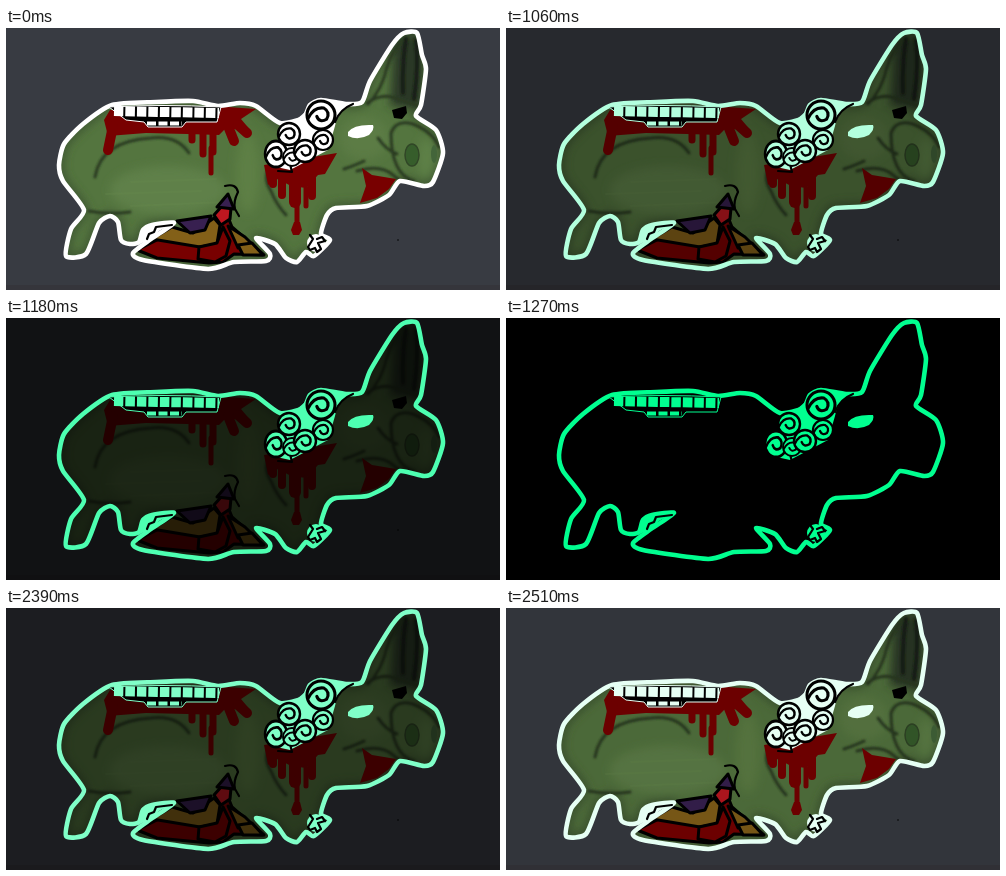
Write an HTML page that moves like this. It is 494 by 262 pixels and loops after 2.54 s.

```html
<!DOCTYPE html>
<html lang="en">
<head>
<meta charset="utf-8">
<title>Zombie pig</title>
<style>
  html, body { margin: 0; width: 100%; height: 100%; overflow: hidden; background: #000; }
  svg { display: block; width: 494px; height: 262px; color: #fff; }
  path { stroke-linejoin: round; stroke-linecap: round; }
  .ink { fill: none; stroke: #000; stroke-width: 2.2; }
  .crease { fill: none; stroke: #293a20; stroke-width: 3; }
  .blood { fill: #780000; }
  .drips { fill: none; stroke: #780000; }
  .guts path { stroke: #000; stroke-width: 3; }
  .glow { fill: currentColor; }
  .teeth path { fill: none; stroke: currentColor; stroke-linecap: butt; }
</style>
</head>
<body>
<svg viewBox="0 0 494 262">
  <defs>
    <path id="outline"/>
    <clipPath id="inside"><use href="#outline"/></clipPath>
    <filter id="soft" x="-30%" y="-30%" width="160%" height="160%"><feGaussianBlur stdDeviation="5"/></filter>
    <filter id="smudge" x="-30%" y="-30%" width="160%" height="160%"><feGaussianBlur stdDeviation=".9"/></filter>
    <g id="curl">
      <circle class="glow" r="10" stroke="#000" stroke-width="2.2"/>
      <path class="ink" d="M-9 2 Q-5 -6 2 -5 Q7 -2 4 3 Q-1 6 -3 1"/>
    </g>
  </defs>

  <!-- Everything here fades to black -->
  <rect width="494" height="262" fill="#383b42"/>
  <rect y="257" width="494" height="5" fill="#35353b"/>
  <circle cx="392" cy="212" r=".8"/>
  <g clip-path="url(#inside)">
    <use href="#outline" fill="#54753f"/>
    <g filter="url(#soft)">
      <use href="#outline" fill="none" stroke="#3d5530" stroke-width="9"/>
      <ellipse cx="162" cy="162" rx="58" ry="24" fill="#5f8048"/>
      <ellipse cx="242" cy="145" rx="12" ry="40" fill="#5d7f45"/>
      <ellipse cx="358" cy="110" rx="25" ry="22" fill="#5c7b45"/>
      <path d="M388 10 L415 5 415 82 384 78Z" fill="#2c3826"/>
      <ellipse cx="421" cy="130" rx="9" ry="20" fill="#5d8046"/>
    </g>
    <path d="M125 154 L210 151 M100 166 L195 163 M125 178 L220 174" stroke="#69884e" stroke-opacity=".3" stroke-width="2"/>
    <g class="crease" filter="url(#smudge)">
      <path d="M89 149 Q95 113 145 110 Q171 107 183 125 M83 183 Q102 187 124 184"/>
      <path d="M265 138 Q256 149 265 163 Q270 176 280 187 M338 141 Q350 137 358 133 M351 143 Q374 136 387 147 Q396 156 408 153"/>
      <path d="M362 76 Q376 62 381 39 Q387 20 400 9 M361 75 Q376 65 389 70 L413 78"/>
      <path d="M433 119 Q427 104 407 96 Q390 91 385 105 Q385 145 407 153 M372 110 Q380 122 391 126"/>
      <path d="M400 11 Q396 35 397 65 M410 12 Q413 39 408 71" stroke="#161f13" stroke-width="4"/>
    </g>
    <ellipse cx="406" cy="127" rx="7" ry="11" fill="#365d2b" stroke="#304626" stroke-width="1.5"/>
    <ellipse cx="428" cy="126" rx="3" ry="9" fill="#43653a"/>
    <path d="M386 82 L400 78 401 85 396 91 388 90Z"/>
  </g>

  <path class="blood" d="M104 82 L98 92 102 108 140 105 181 106 213 107 220 100 245 103 235 91 250 81 222 79Z"/>
  <g class="drips">
    <path stroke-width="10" d="M107 98 L102 122 M222 98 L228 113 M232 97 L241 105"/>
    <path stroke-width="7" d="M186 102 V112 M197 104 V126 M207 104 V124"/>
    <path stroke-width="5" d="M205 120 V145"/>
  </g>
  <path class="blood" d="M258 137 L262 157 272 151 285 158 300 160 312 147 319 146 331 125Z"/>
  <g class="drips">
    <path stroke-width="8" d="M276 148 V167 M306 150 V168 M267 148 V156"/>
    <path stroke-width="12" d="M289 150 V174"/>
    <path stroke-width="5" d="M291 170 V200 M300 160 V178"/>
  </g>
  <path class="blood" d="M288 194 H294 L296 202 293 207 H287 L285 202Z"/>
  <path class="blood" d="M356 140 L366 147 390 151 383 161 371 170 354 175 360 158Z"/>

  <g class="guts">
    <path class="blood" d="M131 222 L171 202 189 207 220 184 226 199 258 227 228 226 217 234 203 235 151 230Z"/>
    <path fill="#836018" d="M146 211 L166 199 187 205 208 190 214 197 211 216 194 219Z"/>
    <path fill="#382050" d="M171 193 L205 188 199 202 184 205Z"/>
    <path fill="#836018" d="M222 198 L239 209 247 217 232 220Z"/>
    <path class="blood" d="M193 219 L211 215 217 199 224 213 220 228 209 234 192 231Z"/>
    <path fill="#836018" d="M232 217 L246 215 257 227 237 227Z"/>
    <path fill="#be1720" d="M208 187 L216 178 225 180 224 191 215 197Z"/>
    <path fill="#382050" d="M211 179 L222 166 228 181Z"/>
  </g>
  <path class="ink" d="M219 158 Q230 155 232 164 Q227 174 229 181 L233 188"/>

  <rect id="shade" width="494" height="262" opacity="0"/>

  <!-- White parts turn green; the black lines on them stay -->
  <use href="#outline" fill="none" stroke="currentColor" stroke-width="4.6"/>
  <path class="glow" d="M136 200 L150 195 169 194 153 203 145 212 133 216Z"/>
  <path class="ink" d="M141 211 L143 206 148 204 150 199 166 197"/>

  <g class="teeth">
    <path d="M103 79 Q155 76 215 79 L211 94 H180 L176 99 H142 L138 94 120 92Z" style="fill:#000"/>
    <path d="M108 83 Q155 84 213 85" stroke-width="10" stroke-dasharray="9.5 2"/>
    <path d="M141 95.5 H176" stroke-width="4" stroke-dasharray="9 2.5"/>
  </g>

  <path class="glow" d="M306 78 Q322 70 347 76 Q332 82 329 98 L322 122 284 142 266 138 276 104Z"/>
  <path class="ink" d="M347 76 Q334 81 329 94 M284 136 L286 144 272 143"/>
  <use href="#curl" transform="translate(270 126) scale(1.1 1.3)"/>
  <use href="#curl" transform="translate(283 106) scale(1.1)"/>
  <use href="#curl" transform="translate(286 129) scale(.9)"/>
  <use href="#curl" transform="translate(315 87) scale(1.4)"/>
  <use href="#curl" transform="translate(317 112)"/>
  <use href="#curl" transform="translate(299 123) scale(1.1)"/>

  <path class="glow" d="M342 104 Q348 96 367 97 Q369 101 363 107 Q352 113 342 108Z"/>

  <circle class="glow" cx="310" cy="215" r="9"/>
  <path class="ink" d="M304 207 L307 211 302 219 304 222 309 220 311 224 315 221 312 215 319 213 316 209 311 211"/>
</svg>
<script>
  const LOOP = 2540, STEP = 30;
  const svg = document.querySelector("svg");
  const shade = document.getElementById("shade");

  // Closed curve through the given points, tight enough to keep corners.
  function smoothLoop(text) {
    const points = text.trim().split(/\s*,\s*/).map(pair => pair.split(" ").map(Number));
    const at = i => points[(i + points.length) % points.length];
    const handle = (i, sign) => at(i).map((v, k) => v + sign * (at(i + 1)[k] - at(i - 1)[k]) / 9);
    return `M${at(0)}` + points.map((_, i) => `C${handle(i, 1)} ${handle(i + 1, -1)} ${at(i + 1)}`).join("") + "Z";
  }

  document.getElementById("outline").setAttribute("d", smoothLoop(`
    106 77, 150 74, 187 73, 212 78, 234 75, 250 78, 274 95, 297 90, 304 77, 315 72, 340 76, 356 74,
    364 53, 386 17, 398 5, 411 5, 416 27, 420 41, 415 77, 410 88, 430 102, 437 125, 427 154, 418 158,
    394 153, 383 167, 361 178, 330 180, 321 187, 315 206, 324 212, 308 228, 300 224, 291 234, 280 230,
    269 216, 250 210, 264 226, 260 233, 228 234, 202 241, 137 232, 127 225, 145 211, 168 195, 146 197,
    137 202, 133 214, 124 216, 115 212, 112 194, 104 188, 93 195, 80 226, 60 228, 65 201, 78 182,
    57 153, 53 137, 58 116, 77 96`));

  function darkness(t) {
    const steps = start => (Math.floor((t - start) / STEP) + 1) / 10;
    if (t < 1000) return 0;
    if (t < 1270) return steps(1000);
    if (t < 2270) return 1;
    return 1 - steps(2270);
  }

  const start = performance.now();
  function draw() {
    const dark = darkness((performance.now() - start) % LOOP);
    shade.setAttribute("opacity", dark);
    svg.style.color = `rgb(${255 * (1 - dark)}, 255, ${255 - 111 * dark})`;
    requestAnimationFrame(draw);
  }
  draw();
</script>
</body>
</html>
```
